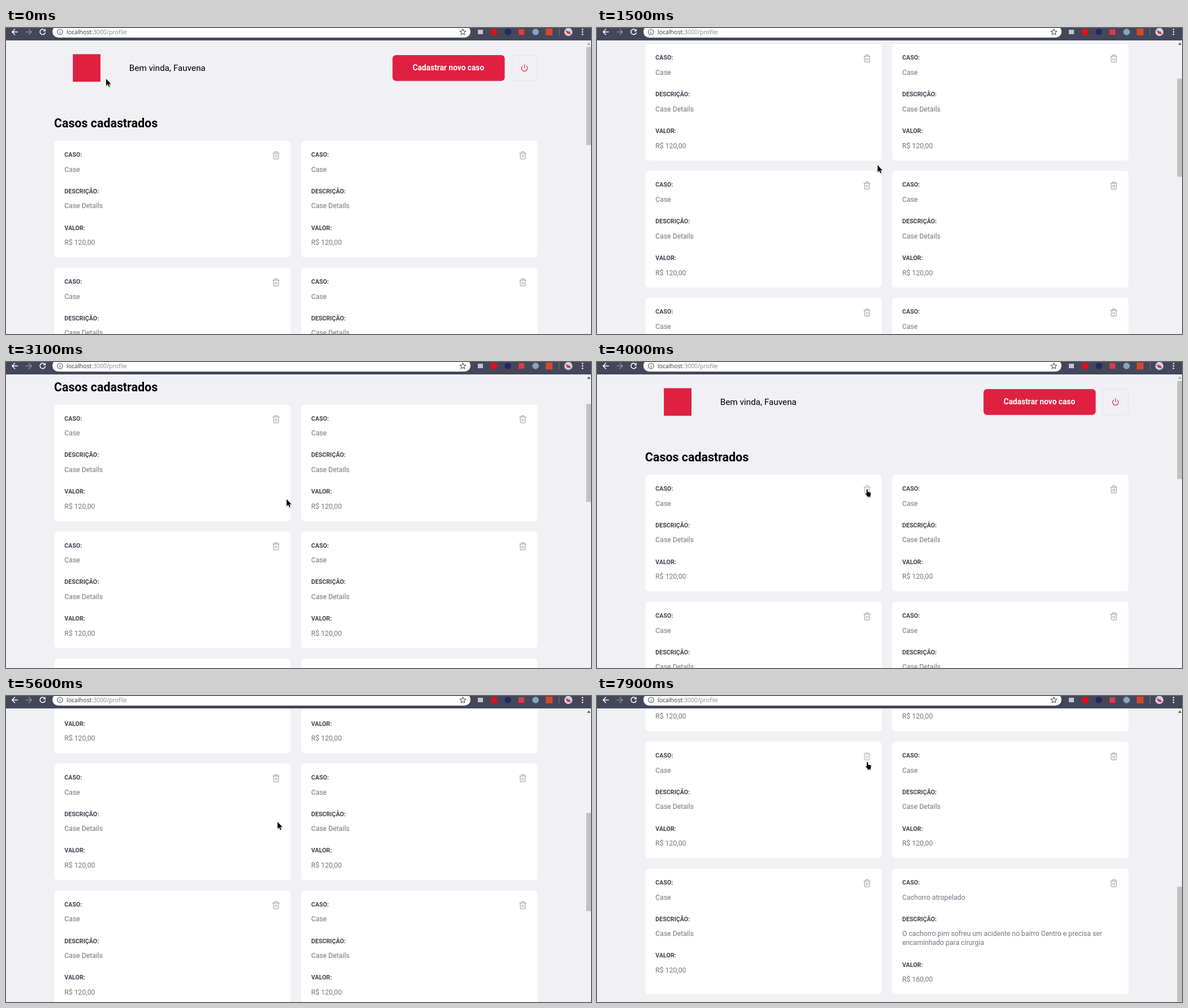
An HTML page for the animation above (8 s loop, 1034x542 px).

```html
<!DOCTYPE html>
<html lang="pt-BR">
<head>
<meta charset="utf-8">
<title>Casos cadastrados</title>
<style>
* { margin: 0; padding: 0; box-sizing: border-box; }
html, body { width: 100%; height: 100%; overflow: hidden; background: #f0f0f5; }
svg { display: block; fill: none; stroke-linecap: round; stroke-linejoin: round; }
#stage { position: relative; width: 1034px; height: 542px; overflow: hidden; }
#bar { position: absolute; left: 0; top: 0; width: 1034px; height: 22px; background: #44475a; }
#bar svg { position: absolute; left: 0; top: 0; }
#url { position: absolute; left: 107px; top: -1px; font: 10.55px/16px "Open Sans", "Noto Sans", sans-serif; color: #33364a; white-space: nowrap; }
#url span { color: #85878f; }

/* The page is laid out at full size and shown at 76.25 % */
#view { position: absolute; left: 0; top: 22px; width: 1357px; height: 696px; overflow: hidden;
  transform: scale(.7625); transform-origin: 0 0; font: 400 14px Roboto, sans-serif; }
#page { position: absolute; left: 111.5px; top: 0; width: 1120px; padding-top: 32px; }
header { display: flex; align-items: center; height: 64px; }
.logo { width: 64px; height: 64px; margin: 0 43px; background: #e02041; }
header span { font-size: 20px; margin-left: 24px; color: #000; }
.new { width: 260px; height: 60px; margin-left: auto; border-radius: 8px; background: #e02041;
  color: #fff; font-size: 18px; font-weight: 700; line-height: 60px; text-align: center; }
.power { width: 60px; height: 60px; margin-left: 16px; border: 1px solid #dcdce6; border-radius: 4px;
  display: flex; align-items: center; justify-content: center; }
h1 { margin: 80px 0 24px; font-size: 28px; line-height: 33px; font-weight: 700; color: #000; }
ul { display: grid; grid-template-columns: 1fr 1fr; gap: 24px; list-style: none; }
li { position: relative; padding: 24px; border-radius: 8px; background: #fff; }
li strong { display: block; margin-bottom: 16px; line-height: 16px; font-weight: 700; color: #41414d; }
li p { font-size: 16px; line-height: 21px; color: #737380; }
li p + strong { margin-top: 32px; }
li svg { position: absolute; right: 24px; top: 24px; }
li.hover svg { opacity: .8; }
#track { position: absolute; left: 1343px; top: 0; width: 15px; height: 696px; background: #f1f1f1; }
#thumb { position: absolute; left: 2px; top: 15px; width: 13px; background: #c1c1c1; }
#up { position: absolute; left: 3.5px; top: 5px; border: 4px solid transparent; border-top: 0; border-bottom: 5px solid #505050; }
#cursor { position: absolute; left: 0; top: 0; overflow: visible; filter: drop-shadow(.6px 1px .7px rgba(0,0,0,.3)); }
#cursor path { fill: #000; stroke: #fff; stroke-width: 1.4; paint-order: stroke; }
</style>
</head>
<body>
<div id="stage">
  <div id="view">
    <div id="page">
      <header>
        <div class="logo"></div>
        <span>Bem vinda, Fauvena</span>
        <div class="new">Cadastrar novo caso</div>
        <div class="power">
          <svg width="18" height="18" viewBox="0 0 24 24" stroke="#e02041" stroke-width="2"><path d="M18.4 6.6a9 9 0 1 1-12.8 0M12 2v10"/></svg>
        </div>
      </header>
      <h1>Casos cadastrados</h1>
      <ul id="list"></ul>
    </div>
    <div id="track"><div id="up"></div><div id="thumb"></div></div>
  </div>

  <div id="bar">
    <svg width="1034" height="22" stroke-width="1.6">
      <rect x="82" y="-4" width="739" height="21" rx="10.5" fill="#fff"/>
      <path d="M20.5 7H11M15.5 2.2L10.8 7l4.7 4.8" stroke="#fff"/>
      <path d="M35.5 7H45M40.500 2.200L45.200 7l-4.700 4.800" stroke="#8b8d9b"/>
      <path d="M68.700 4.200A4.700 4.700 0 1 0 69.300 8.300" stroke="#fff"/>
      <path d="M70 1.300V6h-4.700z" fill="#fff"/>
      <g stroke="#55586a" stroke-width="1.1">
        <circle cx="95.500" cy="7" r="4.800"/>
        <path d="M95.500 6.700v2.700M95.500 4.600v.1"/>
        <path d="M807.500 1.800l1.500 3.500 3.800.3-2.900 2.500.9 3.700-3.300-2-3.300 2 .9-3.700-2.900-2.500 3.800-.3z"/>
      </g>
      <rect x="834" y="3" width="9" height="8" fill="#c3c5cc"/>
      <circle cx="862.500" cy="7" r="6" fill="#e0101c"/>
      <circle cx="887" cy="7" r="5.800" fill="#1f2a66"/>
      <rect x="906" y="2" width="10" height="10" fill="#dd3b45"/>
      <circle cx="936" cy="7" r="5.800" fill="#86a5c4"/>
      <rect x="954" y="1" width="12" height="12" fill="#d4482c"/>
      <path d="M977.500 1v12" stroke="#74768a" stroke-width="1"/>
      <circle cx="994" cy="7" r="7.200" fill="#cbd3e4"/>
      <path d="M989 4l8 3 1 4-6-1z" fill="#d6303c"/>
      <g fill="#fff"><circle cx="1019" cy="2.800" r="1.300"/><circle cx="1019" cy="7" r="1.300"/><circle cx="1019" cy="11.200" r="1.300"/></g>
    </svg>
    <div id="url">localhost<span>:3000/profile</span></div>
  </div>

  <svg id="cursor" width="12" height="16">
    <path id="arrow" d="M0 0V12L2.800 9.600 4.800 14 6.700 13.200 4.800 8.900H8.400Z"/>
    <path id="hand" d="M2.500 1.200Q3.500 0 4.500 1.200V5L8.800 6Q10 6.400 10 7.600L9.200 11V13.600H3.600V12L.6 8.600Q0 7.400 1.200 7.400L2.500 8.200Z"/>
  </svg>
</div>
<script>
const LOOP = 8000, VIEW = 696, TRACK = 666, FULL = 2032, ROW = 295;
const DELETED_AT = 7600;
const $ = id => document.getElementById(id);

const trash = `<svg width="20" height="20" viewBox="0 0 24 24" stroke="#a8a8b3" stroke-width="2">
  <path d="M3 6h18M19 6v14a2 2 0 0 1-2 2H7a2 2 0 0 1-2-2V6m3 0V4a2 2 0 0 1 2-2h4a2 2 0 0 1 2 2v2M10 11v6M14 11v6"/></svg>`;

const card = (title, details, value) => `<li><strong>CASO:</strong><p>${title}</p>
  <strong>DESCRIÇÃO:</strong><p>${details}</p>
  <strong>VALOR:</strong><p>R$ ${value},00</p>${trash}</li>`;

$('list').innerHTML = card('Case', 'Case Details', 120).repeat(10) +
  card('Cachorro atropelado',
    'O cachorro pim sofreu um acidente no bairro Centro e precisa ser encaminhado para cirurgia', 160);
const cards = [...$('list').children];

// [time, scroll offset]
const scrolls = [
  [0, 0], [1000, 8], [1100, 33], [1200, 66], [1300, 115], [1400, 170], [1500, 225],
  [1700, 350], [1800, 500], [1900, 641], [2000, 760], [2400, 1336],
  [3100, 163], [3200, 102], [3400, 26], [3500, 0],
  [5000, 257], [5300, 455], [5600, 695], [5900, 1040], [6100, 1284], [6300, 1324],
  [DELETED_AT, 1041]
];

// [time, x, y, is hand]
const pointer = [
  [1000, 496, 243], [3400, 490, 240], [3500, 479, 233],
  [3700, 466.5, 223.5, 1], [4000, 474, 225, 1],
  [5000, 480, 223], [6500, 475.5, 203.5], [6900, 482, 139],
  [7200, 474.5, 116.5, 1], [7400, 472.5, 118, 1], [7900, 474.5, 116.5, 1]
];

const at = (keys, t) => keys.findLast(k => k[0] <= t);
const bezier = (u, a, b, c, d) => {
  const v = 1 - u;
  return v * v * v * a + 3 * v * v * u * b + 3 * v * u * u * c + u * u * u * d;
};

// Opening sweep, sampled ten times a second
function sweep(t) {
  const u = Math.floor(t / 100) / 9;
  return [t, bezier(u, 177, -34, 150, 452), bezier(u, 90, -60, 468, 300)];
}

function hovered(t) {
  if (t >= 3700 && t < 5000) return 0;
  if (t >= 7200) return t < DELETED_AT ? 8 : 6;
  return -1;
}

function draw(t) {
  const scroll = at(scrolls, t)[1];
  const deleted = t >= DELETED_AT;
  const height = FULL - (deleted ? ROW : 0);
  const hover = hovered(t);

  $('page').style.transform = `translateY(${-scroll}px)`;
  $('thumb').style.height = TRACK * VIEW / height + 'px';
  $('thumb').style.transform = `translateY(${scroll * TRACK / height}px)`;
  $('up').style.borderBottomColor = scroll ? '#505050' : '#a3a3a3';
  cards[9].style.display = deleted ? 'none' : '';
  cards.forEach((c, i) => c.classList.toggle('hover', i === hover));

  const [, x, y, hand] = t < 1000 ? sweep(t) : at(pointer, t);
  $('cursor').style.transform = `translate(${x}px, ${y}px)`;
  $('hand').style.display = hand ? '' : 'none';
  $('arrow').style.display = hand ? 'none' : '';
}

const start = performance.now();
function tick() {
  draw((performance.now() - start) % LOOP);
  requestAnimationFrame(tick);
}
tick();
</script>
</body>
</html>
```
